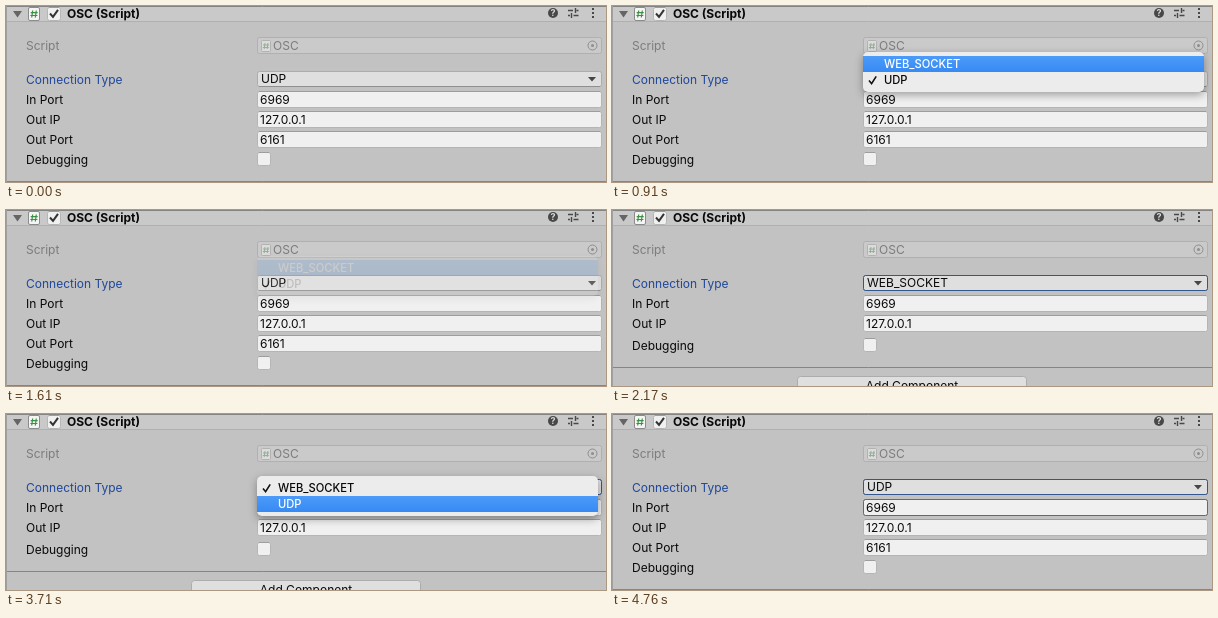
Write an HTML page that moves like this. It is 600 px wide and 176 px high and loops after 4.97 s.

```html
<!DOCTYPE html>
<html lang="en">
<head>
<meta charset="utf-8">
<title>Component inspector</title>
<style>
  html, body { margin: 0; width: 100%; height: 100%; overflow: hidden; background: #c2c2c2; }
  svg { display: block; width: 600px; height: 176px; font: 12px Inter, sans-serif; fill: #090909; }
  .bold { font-weight: 700; }
  .muted { fill: #7c7c7c; }
  .active { fill: #1f479b; }
  .field { fill: #f0f0f0; stroke: #b5b5b5; }
  .fieldTop { stroke: #9d9d9d; }
  .line { stroke: #858585; }
  .menu { font-size: 11.2px; font-weight: 500; filter: drop-shadow(0 3px 4px rgba(0, 0, 0, .34)); }
  .lit { fill: #fff; }
  .check { fill: none; stroke: currentColor; stroke-width: 1.6; }

  /* The whole loop is a set of hard-stepped states. */
  .step { animation: 4970ms step-end infinite; }
  #udpForm { animation-name: udpForm; }
  #webForm { animation-name: webForm; }
  #focus { animation-name: focus; }
  #hover { animation-name: hover; }
  #firstMenu { animation-name: firstMenu; }
  #firstOld { animation-name: firstOld; }
  #firstNew { animation-name: firstNew; }
  #secondMenu { animation-name: secondMenu; }
  #secondOld { animation-name: secondOld; }
  #secondNew { animation-name: secondNew; }

  @keyframes udpForm { 0%, 94.36%, 100% { opacity: 1 } 33.8% { opacity: 0 } }
  @keyframes webForm { 0%, 94.36%, 100% { opacity: 0 } 33.8% { opacity: 1 } }
  @keyframes focus { 0% { opacity: 0 } 33.8%, 100% { opacity: 1 } }
  @keyframes hover { 0% { opacity: 0 } 95.77%, 100% { opacity: 1 } }
  @keyframes firstMenu {
    0%, 33.8%, 100% { opacity: 0 }
    7.04% { opacity: 1 }
    29.57% { opacity: .87 }
    30.98% { opacity: .5 }
    32.39% { opacity: .16 }
  }
  @keyframes firstOld { 0% { opacity: 1 } 18.3%, 100% { opacity: 0 } }
  @keyframes firstNew { 0%, 26.76% { opacity: 0 } 18.3%, 28.16%, 100% { opacity: 1 } }
  @keyframes secondMenu {
    0%, 94.36%, 100% { opacity: 0 }
    59.15% { opacity: 1 }
    90.14% { opacity: .87 }
    91.54% { opacity: .5 }
    92.95% { opacity: .16 }
  }
  @keyframes secondOld { 0% { opacity: 1 } 67.6%, 100% { opacity: 0 } }
  @keyframes secondNew { 0%, 87.32% { opacity: 0 } 67.6%, 88.73%, 100% { opacity: 1 } }
</style>
</head>
<body>
<svg viewBox="0 0 600 176">
  <defs>
    <linearGradient id="blue" x2="0" y2="1">
      <stop stop-color="#4c9bfa"/>
      <stop offset="1" stop-color="#378af3"/>
    </linearGradient>
    <g id="input">
      <rect class="field" x="251.5" y=".5" width="344" height="16" rx="2"/>
      <path class="fieldTop" d="M253 .5h341"/>
    </g>
    <g id="box">
      <rect class="field" x=".5" y=".5" width="13" height="13" rx="2"/>
      <path class="fieldTop" d="M2 .5h10"/>
    </g>
    <path id="tick" class="check" d="M257 8.5l2.6 3.2 4.6-7.4"/>
    <rect id="sheet" x="251" width="341" height="40" rx="5" fill="#ececec"/>
    <rect id="bar" x="251" width="341" height="16" fill="url(#blue)"/>
    <text id="udpItem" x="272" y="12">UDP</text>
    <text id="webItem" x="272" y="12">WEB_SOCKET</text>
  </defs>

  <rect width="600" height="176" fill="#c2c2c2"/>

  <!-- header -->
  <rect width="600" height="15" fill="#c9c9c9"/>
  <path class="line" d="M0 .5h600"/>
  <path d="M0 15.5h600" stroke="#b0b0b0"/>
  <path d="M7 5h9l-4.500 6.500z" fill="#656565"/>
  <rect x="22.500" y="1.500" width="11" height="13" rx="1.500" fill="#f5f5f5" stroke="#8b8b8b"/>
  <path d="M26.700 4.500l-1 7M30.300 4.500l-1 7M24.700 6.700h7M24.400 9.500h7" fill="none" stroke="#3b9142" stroke-width="1.200"/>
  <use href="#box" x="41" y="1"/>
  <path d="M44 7.500l3 3.300 5-7" fill="none" stroke="#333" stroke-width="2"/>
  <text class="bold" x="61" y="12">OSC (Script)</text>
  <circle cx="547" cy="7" r="5" fill="#484848"/>
  <text class="bold" x="547" y="10.200" font-size="9" text-anchor="middle" fill="#ddd">?</text>
  <path d="M562 4.500h5m3.500 0h2M562 9.500h2m3.500 0h5M569.500 2v5M565.500 7v5" stroke="#484848" stroke-width="1.400"/>
  <path d="M586 2h2v2h-2zm0 4h2v2h-2zm0 4h2v2h-2z" fill="#484848"/>

  <!-- disabled script reference -->
  <text class="muted" x="20" y="44">Script</text>
  <rect x="251.500" y="31.500" width="344" height="16" rx="2" fill="#cacaca" stroke="#b0b0b0"/>
  <rect x="255.500" y="34.500" width="9" height="11" rx="1" fill="#dcdcdc" stroke="#b2b2b2"/>
  <path d="M259 37l-.8 6M262 37l-.8 6M257 39h6M256.800 41.500h6" stroke="#94af96"/>
  <text class="muted" x="267" y="44">OSC</text>
  <circle cx="586.500" cy="39.500" r="4.500" fill="none" stroke="#8e8e8e"/>
  <circle cx="586.500" cy="39.500" r="1.500" fill="#8e8e8e"/>

  <!-- fields shared by both forms -->
  <text class="active" x="20" y="78">Connection Type</text>
  <rect x="251.500" y="65.500" width="344" height="15" rx="2" fill="#dfdfdf" stroke="#acacac"/>
  <path d="M253 80.500h341" stroke="#8f8f8f"/>
  <path d="M582 71h8l-4 4.500z" fill="#464646"/>
  <rect id="focus" class="step" x="251.500" y="65.500" width="344" height="15" rx="2" fill="none" stroke="#34568f"/>
  <use href="#input" y="85"/>
  <use href="#input" y="105"/>
  <rect id="hover" class="step" x="251.500" y="85.500" width="344" height="16" rx="2" fill="none" stroke="#686868"/>
  <text x="20" y="98">In Port</text>
  <text x="254" y="98">6969</text>
  <text x="20" y="118">Out IP</text>
  <text x="254" y="118">127.0.0.1</text>

  <g id="udpForm" class="step">
    <text x="255" y="77">UDP</text>
    <use href="#input" y="125"/>
    <text x="20" y="138">Out Port</text>
    <text x="254" y="138">6161</text>
    <text x="20" y="158">Debugging</text>
    <use href="#box" x="251" y="146"/>
    <path class="line" d="M0 175.500h600"/>
  </g>

  <g id="webForm" class="step">
    <text x="255" y="77">WEB_SOCKET</text>
    <text x="20" y="140">Debugging</text>
    <use href="#box" x="251" y="128"/>
    <path class="line" d="M0 157.500h600"/>
    <rect x="185.500" y="166.500" width="229" height="20" rx="3" fill="#dfdfdf" stroke="#acacac"/>
    <text x="300" y="180" text-anchor="middle">Add Component</text>
  </g>
  <path d="M.5 0v176" stroke="#a0a0a0"/>

  <!-- drop-down menus -->
  <g id="firstMenu" class="menu step">
    <use href="#sheet" y="46"/>
    <use href="#webItem" y="50"/>
    <use href="#udpItem" y="66"/>
    <use href="#tick" y="66" color="#111"/>
    <g id="firstOld" class="lit step" color="#fff">
      <use href="#bar" y="66"/>
      <use href="#udpItem" y="66"/>
      <use href="#tick" y="66"/>
    </g>
    <g id="firstNew" class="lit step">
      <use href="#bar" y="50"/>
      <use href="#webItem" y="50"/>
    </g>
  </g>

  <g id="secondMenu" class="menu step">
    <use href="#sheet" y="62"/>
    <use href="#webItem" y="66"/>
    <use href="#tick" y="66" color="#111"/>
    <use href="#udpItem" y="82"/>
    <g id="secondOld" class="lit step" color="#fff">
      <use href="#bar" y="66"/>
      <use href="#webItem" y="66"/>
      <use href="#tick" y="66"/>
    </g>
    <g id="secondNew" class="lit step">
      <use href="#bar" y="82"/>
      <use href="#udpItem" y="82"/>
    </g>
  </g>
</svg>
</body>
</html>
```
